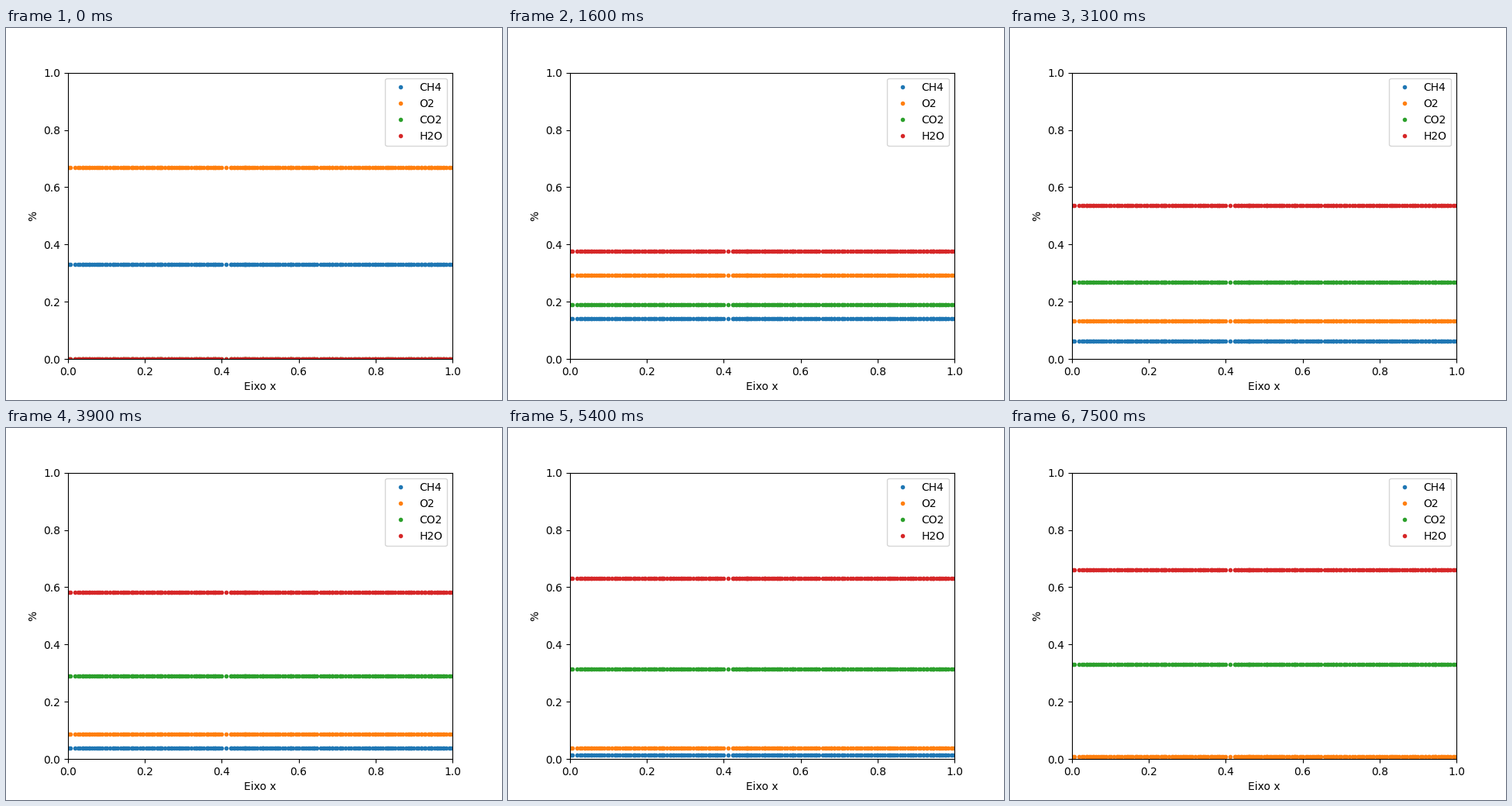
These frames come from a looping animation (640x480 px, 10000 ms). A matplotlib script:

```python
import numpy as np
import matplotlib.pyplot as plt
from matplotlib.animation import FuncAnimation

FRAMES, INTERVAL = 100, 100
LAST = 75                    # step at which the fuel is used up
CH4_0, O2_0 = 0.33, 0.67
RATE = 0.514                 # per second
SUBSTEPS = 100


def methane():
    """CH4 share per step for the rate law CH4^-0.3 * O2^1.3."""
    excess = (O2_0 - 2 * CH4_0) / 2
    dt = INTERVAL / 1000 / SUBSTEPS
    z = CH4_0 ** 1.3
    shares = [CH4_0]
    for _ in range(LAST):
        for _ in range(SUBSTEPS):
            x = z ** (1 / 1.3)
            z = max(z - 1.3 * RATE * (x + excess) ** 1.3 * dt, 0.0)
        shares.append(z ** (1 / 1.3))
    return np.array(shares)


def run(rng, start, end):
    """Unevenly spaced points that fill start to end."""
    count = round((end - start) / 0.0048)
    steps = np.cumsum(rng.uniform(0.0005, 0.0095, count))
    return start + (end - start) * np.append(0, steps / steps[-1])


def positions():
    rng = np.random.default_rng(4)
    return np.concatenate([[0.002, 0.006], run(rng, 0.018, 0.4),
                           [0.412], run(rng, 0.424, 0.996)])


fuel = methane()
xs = positions()

fig, ax = plt.subplots(figsize=(6.4, 4.8), dpi=100)
lines = [ax.plot([], [], ".", label=name)[0]
         for name in ("CH4", "O2", "CO2", "H2O")]
ax.set_xlim(0, 1)
ax.set_ylim(0, 1)
ax.set_xlabel("Eixo x")
ax.set_ylabel("%")
ax.legend(loc="upper right")


def update(i):
    step = min(i, LAST)
    left = fuel[step]
    burnt = CH4_0 - left
    shown = left if step < LAST else np.nan
    levels = (shown, O2_0 - 2 * burnt, burnt, 2 * burnt)
    for line, level in zip(lines, levels):
        line.set_data(xs, np.full(xs.shape, level))
    return lines


anim = FuncAnimation(fig, update, frames=FRAMES, interval=INTERVAL,
                     init_func=lambda: update(0), repeat=True, repeat_delay=0)
plt.show()
```
